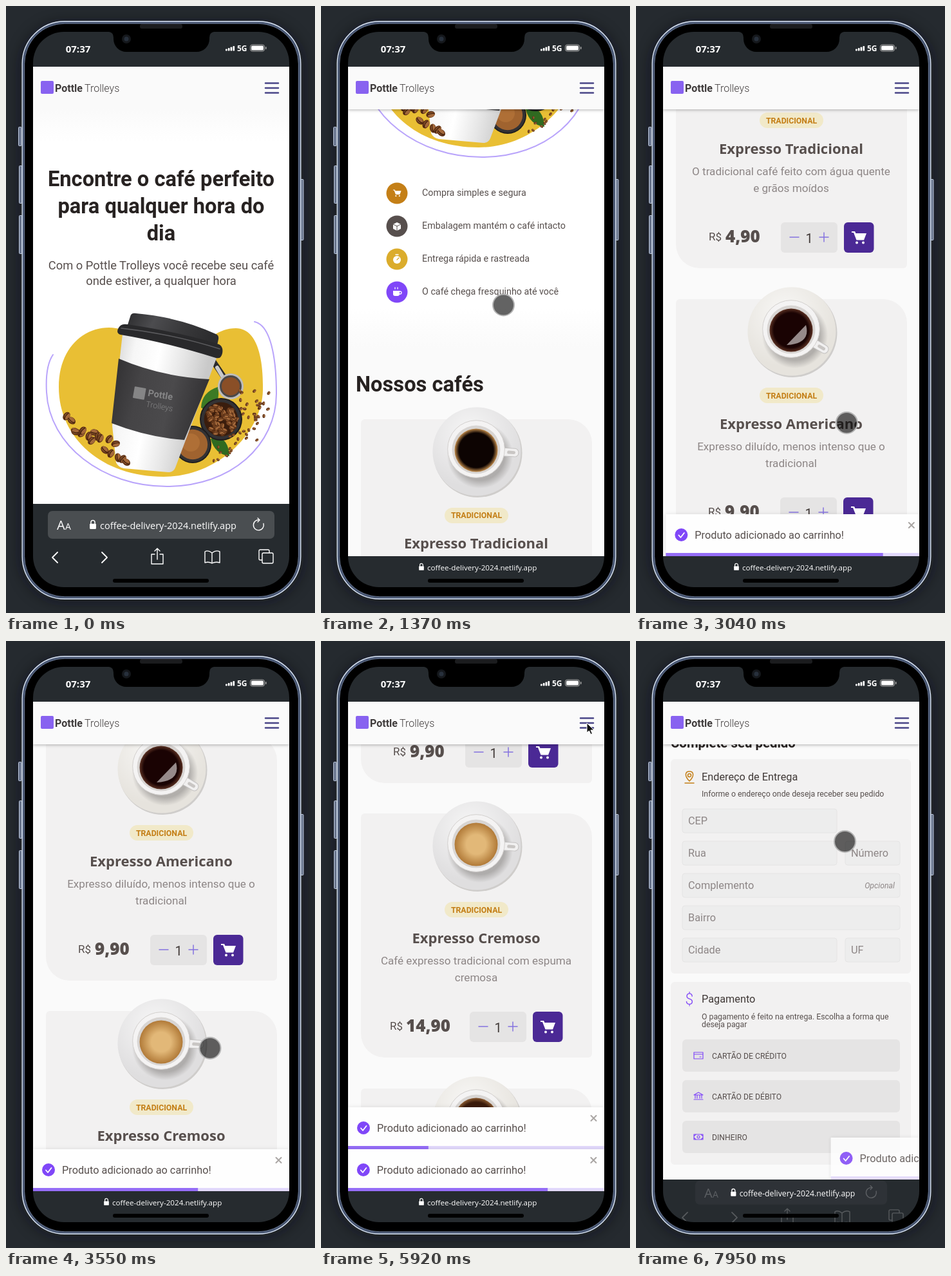
An HTML page for the animation above (8 s loop, 480 by 940 pixels).

```html
<!DOCTYPE html>
<html lang="pt-BR">
<head>
<meta charset="utf-8">
<title>Café</title>
<style>
html, body { margin: 0; width: 100%; height: 100%; overflow: hidden; background: #24292e; }
svg { display: block; font-family: Roboto, sans-serif; }
text { white-space: pre; }
.b { font-weight: 700; }
.l { font-weight: 300; }
.m { text-anchor: middle; }
.e { text-anchor: end; }
.i { font-style: italic; }
.os { font-family: "Open Sans", sans-serif; }
.x { font-family: "Open Sans", sans-serif; font-weight: 800; }
.ln { fill: none; stroke-linecap: round; stroke-linejoin: round; }
</style>
</head>
<body>
<svg id="stage" width="480" height="940" viewBox="0 0 480 940"></svg>
<script>
const INK = '#272221', SUB = '#403937', TEXT = '#574f4d', LABEL = '#8d8686';
const CARD = '#f2f1f1', BUTTON = '#e5e4e4', GOLD = '#dbac2c', BROWN = '#c47f17';
const PURPLE = '#8047f8', DEEP = '#4b2995', BAR = '#262b2f';
const LOOP = 8000;

let seed = 7;
const rnd = () => (seed = seed * 16807 % 2147483647) / 2147483647;
const many = (n, f) => Array.from({ length: n }, (_, i) => f(i)).join('');

// Shape helpers
const text = (x, y, size, s, fill = TEXT, cls = '') =>
  `<text x="${x}" y="${y}" font-size="${size}" fill="${fill}" class="${cls}">${s}</text>`;
const rect = (x, y, w, h, fill, r = 0, more = '') =>
  `<rect x="${x}" y="${y}" width="${w}" height="${h}" rx="${r}" fill="${fill}" ${more}/>`;
const circle = (x, y, r, fill, more = '') => `<circle cx="${x}" cy="${y}" r="${r}" fill="${fill}" ${more}/>`;
const path = (d, fill, more = '') => `<path d="${d}" fill="${fill}" ${more}/>`;
const line = (d, color, w = 1.5, more = '') =>
  `<path class="ln" d="${d}" stroke="${color}" stroke-width="${w}" ${more}/>`;
const at = (x, y, s, more = '', id = '') =>
  `<g ${id && `id="${id}"`} transform="translate(${x} ${y}) ${more}">${s}</g>`;
const stops = list => list.map((c, i) => `<stop offset="${i / (list.length - 1)}" stop-color="${c}"/>`).join('');
const grad = (id, colors, dir = 'x2="0" y2="1"') => `<linearGradient id="${id}" ${dir}>${stops(colors)}</linearGradient>`;
const radial = (id, inner, outer, from) => `<radialGradient id="${id}" cx=".5" cy=".5" r=".5">` +
  `<stop offset="${from}" stop-color="${inner}"/><stop offset="1" stop-color="${outer}"/></radialGradient>`;

const leafCard = (x, y, w, h, r = 37, q = 6) => path(
  `M${x + q} ${y}H${x + w - r}a${r} ${r} 0 0 1 ${r} ${r}V${y + h - q}a${q} ${q} 0 0 1 -${q} ${q}` +
  `H${x + r}a${r} ${r} 0 0 1 -${r} -${r}V${y + q}a${q} ${q} 0 0 1 ${q} -${q}Z`, CARD);

const brand = (x, y, mark, ink) => rect(x, y, 20, 20, mark, 2) +
  text(x + 22, y + 17, 16, 'Pottle', ink, 'b') + text(x + 68, y + 17, 16, 'Trolleys', ink, 'l');

const cart = (fill, k = 1, more = '') => `<g transform="scale(${k})" fill="${fill}" ${more}>` +
  `<path d="M-11-10h5l1.500 3H12L8 3.500H-3.500L-8-8h-3Z"/><circle cx="-3" cy="7.500" r="2"/><circle cx="7" cy="7.500" r="2"/></g>`;
const plusMinus = (x1, x2, y) => line(`M${x1 - 7} ${y}h14M${x2 - 7} ${y}h14m-7-7v14`, '#8573e0');

// Saucer and cup seen from above: plate, rim, coffee, handle angle
const CUPS = [
  ['#dfdedf', '#c08a4a', '#0d0402', 4],
  ['#e6e3dd', '#5a3022', '#1a0303', 30],
  ['#dfdedf', '#b17a38', '#e2b878', 4],
  ['#e6e3dd', '#8a5a30', '#3a1a0a', 30]];

const dish = (x, y, r, kind) => {
  const [plate, , , turn] = CUPS[kind];
  return at(x, y,
    circle(1.5, 2, 70, '#cfcdcb') + circle(0, 0, 69.5, plate) + circle(0, 0, 69.5, 'url(#shine)') +
    circle(5, 6, 52, 'url(#shade)') +
    at(-1, -3, rect(38, -6, 29, 13, '#f1f0f0', 6, 'stroke="#c3c1c0"') + rect(49, -2, 13, 5, '#c9c6c4', 2.5), `rotate(${turn})`) +
    circle(-1, -4, 45, '#f4f3f3', 'stroke="#d2cfcd"') + circle(-1, -3, 38, '#d8d5d3') +
    circle(-1, -2, 34, `url(#coffee${kind})`), `scale(${r / 70})`);
};
const gloss = (x, y) => path(`M${x - 8} ${y + 22}L${x + 22} ${y - 9}Q${x + 30} ${y + 20} ${x - 8} ${y + 22}`, '#a39a99', 'opacity=".9"');

const COFFEES = [
  ['Tradicional', 'O tradicional café feito com água quente', 'e grãos moídos', '4,90', 0],
  ['Americano', 'Expresso diluído, menos intenso que o', 'tradicional', '9,90', -1],
  ['Cremoso', 'Café expresso tradicional com espuma', 'cremosa', '14,90', 6],
  ['Gelado', 'Bebida preparada com café expresso e', 'cubos de gelo', '9,90', -1]];

const product = ([name, d1, d2, price, dx], i) => at(0, 1150 + Math.round(i * 425.7),
  leafCard(62, 0, 359, 378) + dish(242, 50, 69, i) + (i == 1 ? gloss(242, 49) : '') +
  rect(192, 137, 99, 24, '#f1e9c9', 12) + text(241.5, 153.5, 12.3, 'TRADICIONAL', BROWN, 'b m') +
  text(241, 200.5, 22, 'Expresso ' + name, TEXT, 'm os b') +
  text(241, 234, 17.1, d1, LABEL, 'm') + text(241, 259.5, 17.1, d2, LABEL, 'm') +
  at(dx, 0, text(dx > 0 ? 101 : 113, 335, 17, 'R$') + text(dx > 0 ? 126 : 139, 338, 26, price, TEXT, 'x') +
    rect(225, 307, 88, 47, BUTTON, 6) + plusMinus(246, 292, 330) + text(269, 339, 20, '1', SUB, 'm') +
    rect(323, 307, 46.5, 47, DEEP, 6, `id="buy${i}"`) + at(346, 331, cart('#fff', 1, `id="ico${i}"`))));

// Hero picture
const bean = (x, y, r) => at(x, y, `<ellipse rx="${r}" ry="${r * .72}" fill="#5f3216"/>` +
  `<ellipse cx="${-r * .1}" cy="${-r * .12}" rx="${r * .8}" ry="${r * .52}" fill="#a3683a"/>` +
  line(`M${-r * .8} 0Q0 ${r * .35} ${r * .8} 0`, '#3a1b0a', r * .18), `rotate(${rnd() * 180})`);
const around = (n, x, y, spread, size) => many(n, () => {
  const a = rnd() * 6.283, d = Math.sqrt(rnd()) * spread;
  return bean(x + Math.cos(a) * d, y + Math.sin(a) * d, size);
});
const bowl = (x, y, r, fill) => circle(x, y, r, '#1d1c1d') + circle(x, y, r * .94, '#333234') + circle(x, y, r * .8, fill);

const hero = () =>
  path('M82 590C82 530 120 498 160 498C205 498 235 545 262 545C295 545 315 499 357 499C390 499 400 545 399 595C398 660 330 729 245 729C150 729 82 670 82 590Z', '#e9bf34') +
  line('M73 540C62 556 62 580 63 598C67 680 150 744 250 744C350 744 420 680 420 600C420 560 415 495 386 489', '#b9a4fb', 2) +
  path('M303 622Q304 598 329 590Q334 612 317 630Z', '#3c7a25') +
  path('M318 670Q345 663 347 697Q324 694 318 670Z', '#2f6a20') +
  line('M319 546L338 574', '#2b2a2b', 9) + line('M328 560l9 15', '#c9c9c9', 6) +
  circle(349, 589, 20, '#bdbcbc') + circle(349, 589, 17, '#4a4848') + circle(349, 589, 14, '#8a4f27') +
  bowl(334, 640, 33, '#3a1d0d') + around(60, 334, 640, 23, 4.6) +
  bowl(290, 679, 29, '#a0632f') + circle(287, 676, 14, '#b57539', 'opacity=".7"') +
  around(20, 385, 613, 28, 3) + around(18, 370, 657, 26, 2.8) + around(8, 342, 697, 22, 2.6) +
  path('M181 508L165 650L171 707Q174 714 183 716L252 722Q260 722 263 715L329 540Z', 'url(#cup)') +
  path('M175 546Q240 574 316 578L277 672Q220 668 164 646Z', 'url(#sleeve)') +
  path('M193 481Q194 475 202 476Q270 482 326 508Q331 510 330 516L327 530L186 503Z', 'url(#lid)') +
  path('M174 500Q178 491 188 493Q270 505 331 524Q338 528 336 538Q334 547 326 545Q245 520 178 509Q171 507 174 500Z', '#29292b') +
  line('M179 499Q260 508 332 531', '#5b5b5e', 1.5) +
  at(200, 589, rect(0, 0, 18, 18, '#858586', 1) + text(22, 11, 14.5, 'Pottle', '#858586', 'b') +
    text(22, 28, 12.5, 'Trolleys', '#858586', 'l'), 'rotate(10)') +
  many(18, i => bean(92 + i * 5.3 + rnd() * 5, 645 + i * 2.9 + (rnd() - .4) * 26, 7));

const BENEFITS = [
  ['Compra simples e segura', BROWN, cart('#fff', .55)],
  ['Embalagem mantém o café intacto', TEXT, path('M0-6L6-3V4L0 7L-6 4V-3Z', '#fff') + line('M-6-3L0 0L6-3M0 0V7', TEXT, 1)],
  ['Entrega rápida e rastreada', GOLD, circle(0, 1, 6, '#fff') + line('M0 1L3-2', GOLD, 1.3) + line('M-2-7h4', '#fff', 1.5)],
  ['O café chega fresquinho até você', PURPLE, path('M-6-2H4V3a3 3 0 0 1-3 3h-4a3 3 0 0 1-3-3Z', '#fff') +
    line('M4-1h1a2 2 0 0 1 0 4h-1M-3-7v2M1-7v2', '#fff', 1.3)]];

const home = () =>
  rect(42, 94, 398, 3000, '#fafafa') + rect(42, 210, 398, 770, '#fff') +
  rect(42, 150, 398, 61, 'url(#fadeUp)') + rect(42, 979, 398, 61, 'url(#fadeDown)') +
  ['Encontre o café perfeito', 'para qualquer hora do', 'dia'].map((s, i) => text(241, 279 + i * 42, 32.66, s, INK, 'b m')).join('') +
  text(241, 408, 18.35, 'Com o Pottle Trolleys você recebe seu café', TEXT, 'm') +
  text(241, 432, 18.35, 'onde estiver, a qualquer hora', TEXT, 'm') + hero() +
  BENEFITS.map(([s, c, icon], i) => at(118, 800 + i * 51, circle(0, 0, 16.5, c) + icon + text(39, 4.5, 14.3, s))).join('') +
  text(54, 1107, 32.66, 'Nossos cafés', INK, 'b') + COFFEES.map(product).join('');

const field = (x, y, w, label) => rect(x, y, w, 37, '#ededed', 4, `stroke="${BUTTON}"`) +
  text(x + 9, y + 24, 16.3, label, LABEL);
const payment = (y, label, icon) => rect(72, y, 338, 50, BUTTON, 6) + text(118, y + 29.5, 12.2, label) +
  at(97, y + 25, line(icon, PURPLE, 1.2));
const row = (y, size, a, b, cls = '') => text(72, y, size, a, SUB, cls) + text(410, y, size, b, SUB, cls + ' e');

const checkout = () => rect(42, 94, 398, 1700, '#fafafa') + at(0, 63,
  text(54, 165, 20.4, 'Complete seu pedido', INK, 'b') +
  rect(54, 183, 373, 332, CARD, 6) +
  at(83, 211, line('M0 6C-8-2-7-9 0-9S8-2 0 6ZM-7 9H7', BROWN) + circle(0, -3, 2.5, 'none', `stroke="${BROWN}" stroke-width="1.5"`)) +
  text(102, 216, 16.3, 'Endereço de Entrega', SUB) +
  text(102, 241, 12.3, 'Informe o endereço onde deseja receber seu pedido') +
  field(72, 260, 240, 'CEP') + field(72, 310, 240, 'Rua') + field(325, 310, 85, 'Número') +
  field(72, 360, 338, 'Complemento') + text(402, 383, 12.3, 'Opcional', LABEL, 'e i') +
  field(72, 410, 338, 'Bairro') + field(72, 460, 240, 'Cidade') + field(325, 460, 85, 'UF') +
  rect(54, 528, 373, 283, CARD, 6) + text(83, 563, 23, '$', PURPLE, 'm l') +
  text(102, 560, 16.3, 'Pagamento', SUB) +
  text(102, 586, 12.3, 'O pagamento é feito na entrega. Escolha a forma que') + text(102, 598, 12.3, 'deseja pagar') +
  payment(617, 'CARTÃO DE CRÉDITO', 'M-7-5H7V5H-7ZM-7-2H7M2 2H4') +
  payment(680, 'CARTÃO DE DÉBITO', 'M-7-2L0-6L7-2ZM-5-2V3M-2-2V3M2-2V3M5-2V3M-7 5H7') +
  payment(743, 'DINHEIRO', 'M-7-4H7V4H-7ZM-2 0a2 2 0 1 0 4 0a2 2 0 1 0-4 0M-7-1l3-3M7 1l-3 3M7-1l-3-3M-7 1l3 3') +
  text(54, 866, 20.4, 'Cafés selecionados', INK, 'b')) +
  at(0, 777, leafCard(54, 172, 374, 538) + dish(242, 255, 55, 0) +
    text(72, 334, 16.3, 'Expresso Tradicional', SUB) + text(410, 334, 16.3, 'R$ 4,90', TEXT, 'b e') +
    rect(72, 370, 165, 40, BUTTON, 6) + plusMinus(91, 216, 390) + text(154, 396, 16.3, '1', SUB, 'm') +
    rect(245, 370, 165, 40, BUTTON, 6) + at(298, 390, line('M-6-4H6M-4-4V6H4V-4M-2-6H2M-1.500-1V3M1.500-1V3', PURPLE, 1.1)) +
    text(309, 394, 12.2, 'REMOVER') + line('M72 435H410M72 522H410', '#e3e2e2', 1) +
    `<g clip-path="url(#list)">${dish(242, 520, 55, 1)}</g>` +
    row(559, 14.3, 'Itens', 'R$ 29,70') + row(588, 14.3, 'Entrega', 'R$ 5,00') + row(623, 20.4, 'Total', 'R$ 34,70', 'b') +
    rect(72, 651, 338, 41, GOLD, 6) + text(241, 676, 14.2, 'CONFIRMAR PEDIDO', '#fff', 'm b') +
    line('M42 751.5H440', '#e8e8e8', 1) + brand(180, 775, LABEL, LABEL));

const header = () =>
  rect(42, 94, 398, 66, '#fafafa', 0, 'id="head" filter="url(#drop)"') + rect(42, 94, 398, 66, '#fafafa', 0, 'id="headBg"') +
  brand(54, 116, '#8862f0', '#403c3c') +
  line('M403 119.500H423M403 127H423M403 134.500H423', '#4a4688', 2.5, 'id="burger"') +
  line('M405 118.500L422 135.500M422 118.500L405 135.500', DEEP, 2.8, 'id="cross"') +
  '<g clip-path="url(#menuClip)">' +
  at(66, 175, path('M0-9L11 1H8V9H2V3H-2V9H-8V1H-11Z', TEXT)) + text(87, 181, 16.3, 'Início', SUB) +
  at(66, 212, path('M0 11C-12-1-9-10 0-10S12-1 0 11Z', PURPLE) + circle(0, -2, 3, '#fff')) + text(87, 217, 16.3, 'Endereço', SUB) +
  at(66, 249, cart(GOLD, .95)) + text(87, 254, 16.3, 'Carrinho', SUB) + '</g>';

const toast = i => `<g id="toast${i}">` + rect(42, 0, 398, 65, '#000', 0, 'opacity=".1" filter="url(#soft)"') +
  rect(42, 0, 398, 65, '#fefefe') + circle(66, 32, 10, PURPLE) + line('M62 32.500l3 3.500l5.500-7', '#fff', 1.8) +
  text(87, 37.5, 16.3, 'Produto adicionado ao carrinho!') + line('M419.500 13l8 8m0-8l-8 8', '#aaa6a4', 2) +
  rect(42, 60, 398, 5, '#e2d9fc') + rect(42, 60, 398, 5, '#956df7', 0, `id="left${i}"`) + '</g>';

const phone = () => rect(0, 0, 480, 940, '#252a2f') +
  rect(22, 26, 440, 896, '#0c0f12', 68, 'opacity=".5" filter="url(#blur)"') +
  [[19, 187, 30], [20, 247, 59], [20, 324, 60], [457, 268, 95]].map(([x, y, h]) =>
    rect(x + .5, y + .5, 4.5, h - 1, '#68748c', 1, 'stroke="#bcc8dc"')).join('') +
  rect(25.2, 23.7, 432.6, 894.6, '#465470', 66, 'stroke="#dbe6f6" stroke-width="1.4"') +
  rect(28.7, 27.2, 425.6, 887.6, '#000', 62.5, 'stroke="#8192b2" stroke-width=".7"') + rect(208, 28, 66, 7, '#1b1c1e', 3) +
  rect(42, 40, 398, 860, BAR, 48) +
  path('M160 40H323Q316 41 316 49V51a20 20 0 0 1-20 20H187a20 20 0 0 1-20-20V49Q167 41 160 40Z', '#000') +
  circle(187, 51, 7, '#15181c') + circle(187, 51, 3.5, '#27303c') +
  text(112, 72, 15, '07:37', '#fff', 'os b m') + text(359, 70, 12, '5G', '#fff', 'os b') +
  many(4, i => rect(341 + i * 3.8, 66.5 - i * 1.5, 2.7, 3 + i * 1.5, '#fff', .8)) +
  rect(379.5, 60, 22, 10, 'none', 3, 'stroke="#aaa"') + rect(381, 61.5, 19, 7, '#fff', 1.5) + rect(403, 63, 1.5, 4, '#aaa', .7);

const browser = () => '<g clip-path="url(#screen)">' + rect(65, 782, 352, 43, '#4a4e51', 7, 'id="pill"') +
  '<g id="tools">' + at(0, 0, text(0, 7, 20, 'A', '#fff', 'os') + text(13, 7, 14, 'A', '#fff', 'os'), '', 'aa') +
  at(0, 0, line('M7-2.500A8 8 0 1 1 1-8M1-8l-3-3m3 3l-3 3', '#fff', 1.4), '', 'reload') +
  '<g id="icons">' + line('M80-7l-8 8l8 8M149-7l8 8l-8 8', '#fff', 1.8) +
  line('M231-4h-5V11h18V-4h-5M235 4V-13m-4 4l4-4l4 4M320-6Q314-11 309-8V9Q315 7 320 10Q325 7 332 9V-8Q326-11 320-6V10' +
    'M400-6h13q2 0 2 2V8q0 2-2 2H400q-2 0-2-2V-4q0-2 2-2ZM398 5h-3q-2 0-2-2V-9q0-2 2-2H407q2 0 2 2V-6', '#fff', 1.4) +
  '</g></g><g id="lock">' + rect(-4.5, -3, 9, 7.5, '#fff', 1) + line('M-2.800-3v-2a2.800 2.800 0 0 1 5.600 0v2', '#fff', 1.4) + '</g>' +
  '<text id="url" class="os" fill="#fff">coffee-delivery-2024.netlify.app</text></g>' +
  rect(166, 887, 149, 6, '#000', 3);

stage.innerHTML = '<defs>' +
  grad('fadeUp', ['#f9f9f9', '#fff']) + grad('fadeDown', ['#fff', '#fafafa']) +
  grad('cup', ['#cdcdcd', '#f6f6f6', '#fff', '#e6e6e6', '#c9c9c9'], 'x2=".9" y2=".25"') +
  grad('sleeve', ['#2f2e30', '#454446', '#4b4a4c', '#343335'], 'x2="1" y2=".2"') +
  grad('lid', ['#2a2a2c', '#4c4c4f', '#39393b', '#2d2d2f'], 'x2="1" y2=".2"') +
  CUPS.map(([, rim, coffee], i) => radial('coffee' + i, coffee, rim, i == 2 ? .45 : .8)).join('') +
  '<radialGradient id="shine" cx=".42" cy=".3" r=".6"><stop stop-color="#fff" stop-opacity=".75"/><stop offset="1" stop-color="#fff" stop-opacity="0"/></radialGradient>' +
  '<radialGradient id="shade"><stop offset=".75" stop-color="#8d8a88" stop-opacity=".6"/><stop offset="1" stop-color="#8d8a88" stop-opacity="0"/></radialGradient>' +
  '<filter id="blur"><feGaussianBlur stdDeviation="11"/></filter><filter id="soft" y="-20%" height="140%"><feGaussianBlur stdDeviation="3"/></filter>' +
  '<filter id="drop" y="-20%" height="140%"><feDropShadow dx="0" dy="1" stdDeviation="2.500" flood-opacity=".3"/></filter>' +
  '<clipPath id="view"><rect id="viewBox" x="42" y="94" width="398"/></clipPath>' +
  '<clipPath id="screen"><rect x="42" y="40" width="398" height="860" rx="48"/></clipPath>' +
  '<clipPath id="menuClip"><rect id="menuBox" x="42" y="160" width="398"/></clipPath>' +
  '<clipPath id="list"><rect x="54" y="436" width="374" height="61"/></clipPath></defs>' +
  phone() + '<g clip-path="url(#view)"><g id="home">' + home() + '</g><g id="shop">' + checkout() + '</g>' +
  header() + many(3, toast) + '</g>' + browser() +
  '<g clip-path="url(#screen)">' + circle(0, 0, 16.5, '#000', 'id="touch" fill-opacity=".61" stroke="#b4b4b4" stroke-width="2"') +
  path('M0 0V15L3.500 12L6 17.500L8.500 16.500L6 11H11Z', '#111', 'id="arrow" stroke="#fff"') + '</g>';

// Timeline: [time, value...] points joined by smooth steps
const SCROLL = [[760, 0], [1010, 510], [1370, 510], [1670, 816], [2750, 816], [3000, 1122],
  [3150, 1122], [3450, 1428], [4350, 1428], [4620, 1734]];
const SHOP_SCROLL = [[7080, 777], [7420, 63]];
const MENU = [[5960, 160], [6200, 278], [7710, 278], [7900, 160]];
const POINTER = [[40, 24, 472], [400, 283.5, 463], [1750, 283.5, 463], [2350, 343, 668], [2700, 343, 668],
  [3300, 317, 630.5], [3600, 317, 630.5], [3960, 345, 478], [4230, 345, 478], [4750, 356, 578],
  [4830, 356, 578], [5100, 352, 598], [5390, 352, 598], [5850, 413, 127], [6000, 413, 127],
  [6400, 117, 248], [6560, 117, 248], [6950, 228.5, 397.5], [7430, 228.5, 397.5], [7630, 413, 127],
  [7720, 413, 127], [7930, 324.5, 310.5]];
const PRESS = [[2370, 2640], [4000, 4190], [5130, 5350], [5880, 5960], [6440, 6540], [7640, 7710]];
const TOASTS = [2660, 4205, 5370], STAY = 2500, GONE = 300, NAVIGATE = 6540;

const lerp = (a, b, u) => a + (b - a) * u;
const track = (t, keys) => {
  const i = keys.findIndex(k => k[0] > t);
  if (i < 1) return keys.at(i).slice(1);
  const [a, b] = [keys[i - 1], keys[i]], u = (t - a[0]) / (b[0] - a[0]), s = u * u * (3 - 2 * u);
  return a.slice(1).map((v, j) => lerp(v, b[j + 1], s));
};
const $ = id => document.getElementById(id);
const set = (id, attrs) => { for (const k in attrs) $(id).setAttribute(k, attrs[k]); };
const show = (id, on) => set(id, { display: on ? 'inline' : 'none' });
const move = (id, x, y) => set(id, { transform: `translate(${x} ${y})` });

// Bouncing slide from the right, then a quick exit
const ENTER = [[0, 3000], [340, -25], [430, 10], [510, -5], [570, 0]];
const toastX = age => {
  const out = age - STAY;
  if (out > 0) return out < 20 ? -out : -20 + (out - 20) * 4.6;
  const i = ENTER.findIndex(s => s[0] > age);
  if (i < 0) return 0;
  const [a, b] = [ENTER[i - 1], ENTER[i]], u = (age - a[0]) / (b[0] - a[0]);
  return lerp(a[1], b[1], 1 - (1 - u) ** 3);
};

function draw(t) {
  const shopping = t >= NAVIGATE;
  const [scroll] = track(t, shopping ? SHOP_SCROLL : SCROLL);
  const bottom = 771 + Math.min(81, scroll), open = (852 - bottom) / 81;
  show('home', !shopping);
  show('shop', shopping);
  move(shopping ? 'shop' : 'home', 0, -scroll);
  set('viewBox', { height: bottom - 94 });

  const [menu] = track(t, MENU);
  set('head', { height: menu - 94, opacity: scroll > 0 ? 1 : 0 });
  set('headBg', { height: menu - 94 });
  set('menuBox', { height: menu - 160 });
  const crossed = t >= 5960 && t < 7710;
  show('burger', !crossed);
  show('cross', crossed);

  const live = TOASTS.map(s => t >= s && t < s + STAY + GONE);
  TOASTS.forEach((start, i) => {
    const age = t - start, newer = live.slice(i + 1).filter(Boolean).length;
    show('toast' + i, live[i]);
    if (!live[i]) return;
    move('toast' + i, toastX(age), bottom - 65 * (newer + 1));
    set('toast' + i, { opacity: age > STAY ? 1 - (age - STAY) * .0018 : Math.min(1, age / 300) });
    set('left' + i, { width: 398 * Math.max(0, 1 - age / STAY) });
  });

  const left = lerp(99.6, 65, open), right = lerp(382.4, 417, open), top = lerp(851, 782, open);
  const mid = lerp(869, 804, open);
  set('pill', { x: left, y: top, width: right - left, height: lerp(35.5, 43, open), opacity: open });
  set('tools', { opacity: open });
  move('aa', left + 14, mid);
  move('reload', right - 24, mid);
  move('icons', 0, lerp(903, 853, open));
  set('lock', { transform: `translate(${lerp(156, 135, open)} ${mid + 1}) scale(${lerp(.85, 1.1, open)})` });
  set('url', { x: lerp(165, 146, open), y: lerp(874, 809.5, open), 'font-size': lerp(11.66, 14.5, open) });

  const [x, y] = track(t, POINTER), press = PRESS.findIndex(([a, b]) => t >= a && t < b);
  move('touch', x, y);
  move('arrow', x, y);
  show('touch', press < 0 && t >= 50);
  show('arrow', press >= 0);
  for (let i = 0; i < 3; i++) {
    set('buy' + i, { fill: press == i ? '#3c2077' : DEEP });
    set('ico' + i, { fill: press == i ? '#c4bfcb' : '#fff' });
  }
}

const begin = performance.now();
function tick() {
  draw((performance.now() - begin) % LOOP);
  requestAnimationFrame(tick);
}
tick();
</script>
</body>
</html>
```
